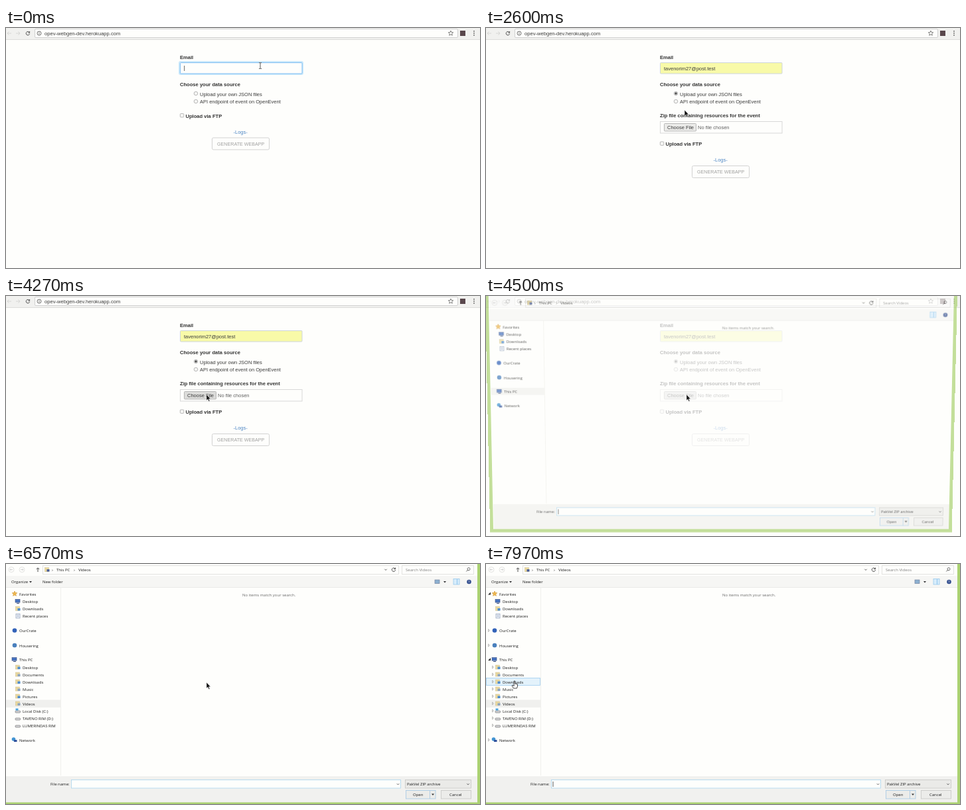
These frames come from a looping animation (714x363 px, 8 s). An HTML page:

```html
<!DOCTYPE html>
<html lang="en">
<head>
<meta charset="utf-8">
<title>Web app generator form</title>
<style>
  html, body { margin: 0; width: 100%; height: 100%; overflow: hidden; background: #fefefc; }
  svg { position: absolute; left: 0; top: 0; width: 714px; height: 363px; overflow: hidden; }
  text { white-space: pre; }
  #page { font: 7.5px "Liberation Sans", Arial, sans-serif; fill: #3c3c3c; }
  #page .bold { font-weight: bold; font-size: 7.58px; fill: #333; }
  #dialog { font: 6px "Open Sans", "Noto Sans", sans-serif; fill: #1c1c1c; overflow: visible; transform-origin: 340px 180px; }
</style>
</head>
<body>
<svg id="page" viewBox="0 0 714 363"></svg>
<svg id="dialog" viewBox="0 0 714 363"></svg>
<svg id="pointer" viewBox="0 0 714 363">
  <path id="arrow" d="M0 0V9L2 7.2L3.6 10.6L5 10L3.5 6.7H6.2Z" fill="#101010" stroke="#fff" stroke-width=".5"/>
  <path id="ibeam" d="M-2 -4.5H-.5L0 -4L.5 -4.5H2M0 -4V4M-2 4.5H-.5L0 4L.5 4.5H2" fill="none" stroke="#444" stroke-width=".9"/>
  <path id="hand" d="M-.8 0H.8V4L4.5 5V8L3.4 11H-1.5L-4 7L-3 6L-.8 7.5Z" fill="#fff" stroke="#1c1c1c" stroke-width=".8"/>
</svg>
<script>
const LOOP = 8000;
const EMAIL = "tavenorim27@post.test";
const TIMES = { autofill: 820, radio: 1740, open: 4380, openLength: 260, loaded: 4800 };
const WHITE = "#fefefc", PANEL = "#f1f1ef", EDGE = "#dcdcda", INK = "#505050";
const $ = id => document.getElementById(id);

// Markup helpers; text is placed by its vertical centre.
const text = (x, y, s, extra = "") => `<text x="${x}" y="${y + 2.6}" ${extra}>${s}</text>`;
const label = (x, y, s, extra = "") => `<text x="${x}" y="${y + 2.3}" ${extra}>${s}</text>`;
const rect = (x, y, w, h, fill, stroke = "none", extra = "") =>
  `<rect x="${x}" y="${y}" width="${w}" height="${h}" fill="${fill}" stroke="${stroke}" ${extra}/>`;
const circle = (x, y, r, fill, stroke = "none") =>
  `<circle cx="${x}" cy="${y}" r="${r}" fill="${fill}" stroke="${stroke}" stroke-width=".8"/>`;
const line = (d, stroke, extra = "") => `<path d="${d}" fill="none" stroke="${stroke}" ${extra}/>`;
const group = (id, body) => `<g id="${id}">${body}</g>`;
const down = (x, y) => `<path d="M${x - 2} ${y - 1}h4l-2 2.4z" fill="#333"/>`;
const chevron = (x, y) => line(`M${x - 1.7} ${y - .8}l1.7 1.7l1.7 -1.7`, INK, 'stroke-width=".9"');
const reload = (x, y) =>
  line(`M${x + 2} ${y - 1.6}A2.7 2.7 0 1 0 ${x + 2.6} ${y + .6}M${x + 2.6} ${y - 3}v2.2h-2.2`, INK);
const star = (x, y, r, fill, stroke) => {
  const points = Array.from({ length: 10 }, (_, i) => {
    const a = i * Math.PI / 5, q = i % 2 ? r * .45 : r;
    return `${x + q * Math.sin(a)},${y - q * Math.cos(a)}`;
  });
  return `<polygon points="${points.join(" ")}" fill="${fill}" stroke="${stroke}" stroke-width=".7"/>`;
};

function buildPage() {
  const bar = rect(0, 0, 714, 17.5, PANEL) + line("M0 17.5H714", EDGE) +
    line("M8 8H2m2.5 -2.5L2 8l2.5 2.5M15 8h6m-2.5 -2.5L21 8l-2.5 2.5", "#d6d6d4") +
    reload(33, 8) + rect(43.5, 1.5, 637, 13, WHITE, "#d0d0d0", 'rx="1.5"') +
    circle(50, 8, 3, "none", INK) + line("M50 7.2v2.4M50 5.9v.7", INK, 'stroke-width=".8"') +
    text(58, 8, "opev-webgen-dev.herokuapp.com", 'font-size="7.6"') +
    star(670, 8, 3.9, "none", INK) + rect(684, 4, 8, 8, "#59474c") +
    [4.8, 7.8, 10.8].map(y => circle(705, y, .9, INK)).join("");

  const email = text(262, 44, "Email", 'class="bold"') +
    `<rect id="glow" x="261.5" y="51.5" width="185" height="18" rx="1.5" fill="none" stroke="#c9e8fb" stroke-width="3"/>` +
    `<rect id="field" x="262.5" y="52.5" width="183.5" height="16.5" rx="1"/>` +
    text(268, 61, "", 'id="email"') + `<path id="caret" d="M0 57v8" stroke="#3c3c3c" stroke-width=".8"/>`;

  const source = text(262, 85.5, "Choose your data source", 'class="bold"') +
    circle(286, 99, 2.8, "#f6f6f4", "#a8a8a8") + circle(286, 111, 2.8, "#f6f6f4", "#a8a8a8") +
    text(292, 100, "Upload your own JSON files") +
    text(292, 111.5, "API endpoint of event on OpenEvent");

  const upload = circle(286, 99, 1.7, "#484848") +
    text(262, 132.5, "Zip file containing resources for the event", 'class="bold"') +
    rect(262.5, 141.5, 183.5, 17.5, WHITE, "#d8d8d8") +
    `<rect id="choose" x="268.5" y="144.5" width="48" height="11.5" rx="1" stroke="#a9a9a9" stroke-width=".8"/>` +
    text(273, 150, "Choose File") + text(319, 150, "No file chosen", 'fill="#606060"');

  const rest = rect(262.4, 129.5, 5.4, 5.4, "#f6f6f4", "#a8a8a8", 'rx="1" stroke-width=".8"') +
    text(270.5, 133.2, "Upload via FTP", 'class="bold"') +
    text(342.5, 157, "-Logs-", 'fill="#4d86c4"') +
    rect(310.5, 166, 86, 18, WHITE, "#d2d2d2", 'rx="2"') +
    text(318, 175, "GENERATE WEBAPP", 'fill="#a0a0a0" font-size="7.15"');

  $("page").innerHTML = rect(0, 0, 714, 363, WHITE) + bar + email + source +
    group("upload", upload) + group("rest", rest);
}

const folder = (x, y, mark) => rect(x - 3.5, y - 3, 6, 6, "#ead9a0", "#c9b983", 'stroke-width=".5"') +
  rect(x - .5, y - .5, 4, 3.5, mark);
const screen = (x, y) => rect(x - 4, y - 3, 7, 4.6, "#4673c0", "#3c5080", 'stroke-width=".6"') +
  line(`M${x - 2} ${y + 3}h4`, "#3c5080");
const drive = (x, y) => rect(x - 4, y, 7.5, 3, "#d5d5d8", "#777", 'rx="1" stroke-width=".7"');
const sheet = (x, y) => rect(x - 3, y - 3, 6, 6.4, "#eef2f8", "#8c9cb8", 'stroke-width=".7"') +
  line(`M${x - 1.5} ${y - 1}h3m-3 2h3`, "#8c9cb8", 'stroke-width=".7"');
const treeRow = (y, name, icon, depth = 1) => icon + label(depth ? 25 : 20, y + .3, name);
const expander = (y, depth, open) => open
  ? `<path d="M3 ${y + 1.5}h4v-4z" fill="#333"/>`
  : line(`M${depth ? 9.5 : 3.5} ${y - 2}l2.2 2l-2.2 2z`, "#a0a0a0", 'stroke-width=".7"');

function buildDialog() {
  const header = circle(8, 8.5, 4, "none", EDGE) + circle(24, 8.5, 4, "none", EDGE) +
    line("M10 8.5H6m1.5 -1.5L6 8.5l1.5 1.5M22 8.5h4m-1.5 -1.5L26 8.5l-1.5 1.5", "#c9c9c9", 'stroke-width=".8"') +
    line("M48 12V6m-2.2 2L48 5.8l2.2 2.2", INK) +
    rect(55.5, 2.5, 536, 13, WHITE, EDGE, 'stroke-width=".8"') + folder(62, 8.5, "#4b5f95") +
    label(69, 8.5, "›") + label(76, 8.5, "This PC") + label(102, 8.5, "›") + label(109, 8.5, "Videos") +
    chevron(572, 8.5) + reload(584, 8.5) +
    rect(596.5, 2.5, 108, 13, WHITE, EDGE, 'stroke-width=".8"') +
    label(602, 8.5, "Search Videos", 'fill="#808080"') +
    circle(697, 7.6, 2, "none", INK) + line("M695.6 9.1l-2.2 2.2", INK);

  const tools = rect(0, 18, 711, 17.5, "#f6f6f4") + line("M0 35.5H711", "#e6e6e4", 'stroke-width=".7"') +
    group("commands", label(8, 27, "Organize") + down(37, 27) + label(55, 27, "New folder") +
      rect(646, 24, 7, 5.5, "#8cb0d0", "#7785a0", 'stroke-width=".7"') + down(661, 27)) +
    rect(674, 22.5, 9, 8.5, "#d7ecfb", "#8fc5ec", 'stroke-width=".7"') + line("M679.5 23v8", "#8fc5ec") +
    circle(697.5, 27, 3.3, "#35508f") + label(696.3, 26.7, "?", 'fill="#fff" font-size="5"');

  const top = treeRow(45, "Favorites", star(13, 45, 4, "#f0b84c", "#d19a3c"), 0) +
    treeRow(56.5, "Desktop", screen(18, 56.5)) +
    treeRow(67.5, "Downloads", folder(18, 67.5, "#4b8bd0")) +
    treeRow(78.5, "Recent places", sheet(18, 78.5)) +
    treeRow(100.5, "OurCrate", circle(13, 100.5, 3.3, "#3262b8"), 0) +
    treeRow(123, "Housering", circle(13, 123, 3.3, "#4a80bd"), 0);
  const pc = treeRow(144.5, "This PC", screen(13, 144.5), 0);

  const children = ["Desktop", "Documents", "Downloads", "Music", "Pictures", "Videos"]
    .map((name, i) => treeRow(156 + 11 * i, name, folder(18, 156 + 11 * i, i % 2 ? "#8ba4c0" : "#4b8bd0"))).join("") +
    treeRow(222, "Local Disk (C:)", drive(18, 222) + rect(14.5, 218.5, 4, 3, "#4ca4e0")) +
    treeRow(233, "TAVENO RIM (D:)", drive(18, 233)) +
    treeRow(244, "LUMERINDAS RIM", drive(18, 244));
  const network = y => treeRow(y, "Network", circle(11.5, y - 1, 2.8, "#4294d2") + rect(12, y, 4.5, 3, "#32539c"), 0);

  const expanders = expander(45, 0, true) + expander(144.5, 0, true) +
    [100.5, 123, 266].map(y => expander(y, 0)).join("") +
    Array.from({ length: 9 }, (_, i) => expander(156 + 11 * i, 1)).join("");

  const footer = rect(0, 321, 711, 40, PANEL) +
    label(67, 332.5, "File name:") +
    rect(98.5, 326.5, 496, 12.5, WHITE, "#a9d4ee", 'stroke-width=".8"') + chevron(590.5, 333) +
    `<path id="nameCaret" d="M101 329v8" stroke="#333" stroke-width=".8"/>` +
    rect(601.5, 326.5, 99, 12.5, "#eaeae8", "#c6c6c4", 'stroke-width=".8"') +
    label(604, 332.5, "PakVel ZIP archive") + chevron(696, 333) +
    rect(602.5, 342.5, 44.5, 12.5, "#ececea", "#a4c8e4", 'stroke-width=".8"') +
    line("M638.5 343v12", "#a4c8e4", 'stroke-width=".8"') + label(613, 348.5, "Open") + down(643, 348.5) +
    rect(655.5, 342.5, 45, 12.5, "#ececea", "#c6c6c4", 'stroke-width=".8"') + label(668, 348.5, "Cancel");

  $("dialog").innerHTML = rect(-3, -10, 715, 372, WHITE) + header + tools +
    line("M82.5 36V320", "#ecece8", 'stroke-width=".8"') +
    group("collapsed", rect(0, 139, 82, 11, "#f1f1ef") + network(166.5)) +
    group("expanded", rect(0, 205.5, 82, 11.5, "#f0f0ee") +
      `<rect id="hover" x=".5" width="81" height="11" fill="#e3f2fb" stroke="#9dcdf0" stroke-width=".8"/>` +
      children + network(266)) +
    top + pc + group("expanders", expanders) +
    label(356, 47, "No items match your search.", 'fill="#686868"') + footer +
    rect(-3.5, -10, 716, 373, "none", "#abd272", 'stroke-width="5"');
}

// Pointer stops: time, x, y
const STOPS = [
  [0, 383, 57], [650, 383, 57], [1000, 345, 78], [1430, 323, 89], [1700, 300, 97], [2230, 300, 97],
  [3000, 298, 154], [3550, 298, 154], [3850, 302, 149], [4520, 302, 149], [5000, 307, 162],
  [5500, 307, 162], [6400, 302, 179], [6750, 302, 179], [7850, 43, 177], [LOOP, 43, 177]
];
function pointerAt(t) {
  const i = Math.max(1, STOPS.findIndex(s => s[0] > t));
  const [t0, x0, y0] = STOPS[i - 1], [t1, x1, y1] = STOPS[i];
  const u = (t - t0) / (t1 - t0), e = u * u * (3 - 2 * u);
  return [x0 + (x1 - x0) * e, y0 + (y1 - y0) * e];
}

const show = (id, on) => { $(id).style.display = on ? "" : "none"; };
const blink = t => t % 1060 < 530;

function drawPage(t, x, y) {
  const filled = t >= TIMES.autofill, focused = t < TIMES.radio, expanded = !focused;
  const typed = filled ? EMAIL.length : (t >= 400) + (t >= 580);
  $("email").textContent = EMAIL.slice(0, typed);
  $("caret").setAttribute("transform", `translate(${268.7 + (typed ? $("email").getComputedTextLength() : 0)} 0)`);
  $("field").setAttribute("fill", filled ? "#f8faa8" : WHITE);
  $("field").setAttribute("stroke", focused ? "#7fbdf2" : "#cdd5dc");
  show("glow", focused);
  show("caret", focused && blink(t));
  show("upload", expanded);
  $("rest").setAttribute("transform", `translate(0 ${expanded ? 42.5 : 0})`);
  const overChoose = x > 268 && x < 317 && y > 144 && y < 157;
  $("choose").setAttribute("fill", overChoose ? "#dcdcda" : "#ebebe9");
}

function drawDialog(t, x, y) {
  const raw = Math.min(1, Math.max(0, (t - TIMES.open) / TIMES.openLength));
  const p = 1 - (1 - raw) ** 2, loaded = t >= TIMES.loaded, inTree = loaded && x < 82;
  show("dialog", raw > 0);
  $("dialog").style.opacity = p;
  $("dialog").style.transform = p === 1 ? "none" :
    `translateY(${-4 * (1 - p)}px) perspective(1200px) rotateX(${-15 * (1 - p)}deg) scale(${1 - .086 * (1 - p)})`;
  show("commands", loaded);
  show("collapsed", !loaded);
  show("expanded", loaded);
  show("expanders", inTree);
  show("hover", inTree);
  $("hover").setAttribute("y", 150.5 + 11 * Math.floor((y - 150.5) / 11));
  show("nameCaret", blink(t + 6110));
  return inTree;
}

function draw(t) {
  const [x, y] = pointerAt(t);
  drawPage(t, x, y);
  const inTree = drawDialog(t, x, y);
  const inField = t < TIMES.open && x > 262 && x < 446 && y > 52 && y < 70;
  const shape = inTree ? "hand" : inField ? "ibeam" : "arrow";
  for (const id of ["arrow", "ibeam", "hand"]) show(id, id === shape);
  $(shape).setAttribute("transform", `translate(${x} ${y})`);
}

buildPage();
buildDialog();
const start = performance.now();
function tick() {
  draw((performance.now() - start) % LOOP);
  requestAnimationFrame(tick);
}
tick();
</script>
</body>
</html>
```
